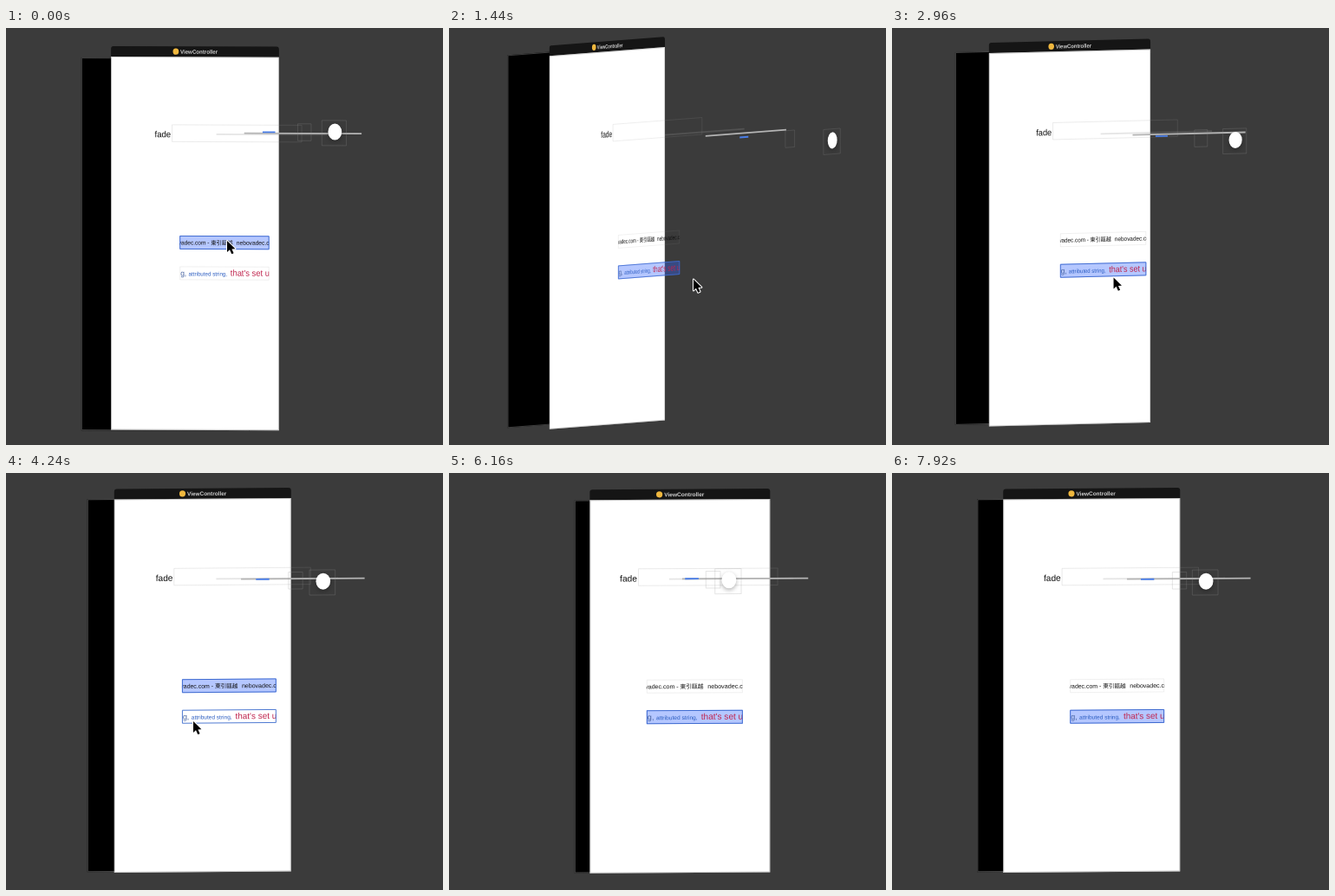
An HTML page with a canvas that plays this animation: 504x482 px, repeating every 8 s.

```html
<!DOCTYPE html>
<html lang="en">
<head>
<meta charset="utf-8">
<title>View hierarchy</title>
<style>
  html, body { margin: 0; width: 100%; height: 100%; overflow: hidden; background: #3b3b3b; }
  canvas { display: block; width: 504px; height: 482px; }
</style>
</head>
<body>
<canvas id="stage" width="504" height="482"></canvas>
<script>
const ctx = document.getElementById('stage').getContext('2d');
const LOOP = 8000, STEP = 80;
const SANS = '"Liberation Sans", Arial, "Noto Sans CJK SC", "Noto Sans CJK", sans-serif';
const FAINT = 'rgba(150,150,150,.25)';
const DRAG = [960, 3360];
const LABEL_Y = [208, 243.5];

// time, turn in degrees, tilt, width factor
const POSES = [
  [960, 19.9, -.027, 1],
  [1440, 46.9, .06, .946],
  [1980, 80, .085, 1],
  [2320, 60, .113, 1],
  [2640, 36, .06, 1],
  [DRAG[1], 14.8, .006, 1.024],
  [5600, 14.8, .006, 1.024],
  [6540, -12.3, -.008, 1],
  [7360, 13.4, .006, 1.018]
];

// free pointer moves: time, tip x, tip y
const MOVES = [
  [160, 255, 246],
  [640, 247, 283],
  [3520, 240, 286],
  [3760, 240, 246],
  [3920, 240, 246],
  [4160, 216, 287],
  [4560, 216, 287],
  [4960, 36, 486]
];

function sample(rows, t) {
  const i = rows.findIndex(r => r[0] > t);
  if (i < 0) return rows[rows.length - 1].slice(1);
  if (i === 0) return rows[0].slice(1);
  const a = rows[i - 1], b = rows[i];
  const f = (t - a[0]) / (b[0] - a[0]);
  return a.slice(1).map((v, j) => v + (b[j + 1] - v) * f);
}

// While dragging, the tip follows the turn and tilt it causes.
function pointerAt(t, deg, tilt) {
  const dragging = t >= DRAG[0] && t < DRAG[1];
  return dragging ? [299 + (deg - 60) * 1.3, 295 + (tilt - .113) * 84] : sample(MOVES, t);
}

function text(str, x, y, size, color, weight = '', align = 'left') {
  ctx.font = `${weight} ${size}px ${SANS}`;
  ctx.textAlign = align;
  ctx.fillStyle = color;
  ctx.fillText(str, x, y);
}

function box(x, y, w, h, fill, stroke) {
  if (fill) { ctx.fillStyle = fill; ctx.fillRect(x, y, w, h); }
  if (stroke) {
    ctx.strokeStyle = stroke;
    ctx.lineWidth = 1;
    ctx.strokeRect(x + .5, y + .5, w - 1, h - 1);
  }
}

function dot(x, y, rx, ry, color) {
  ctx.fillStyle = color;
  ctx.beginPath();
  ctx.ellipse(x, y, rx, ry, 0, 0, 7);
  ctx.fill();
}

function label(y, selected, hovered, drawText) {
  if (selected) box(66, y, 110, 16, 'rgba(50,100,255,.36)');
  ctx.save();
  ctx.beginPath();
  ctx.rect(66, y, 110, 16);
  ctx.clip();
  drawText(y + 11);
  ctx.restore();
  box(66, y, 110, 16, null, selected ? '#3f6bd0' : hovered ? '#4f7ad2' : 'rgba(150,150,150,.15)');
}

function drawPanel() {
  ctx.fillStyle = '#151515';
  ctx.beginPath();
  ctx.roundRect(0, -12, 206, 14, [3, 3, 0, 0]);
  ctx.fill();
  box(0, 0, 206, 431.5, '#fff', 'rgba(150,150,150,.5)');
  dot(79.5, -6, 3.6, 3.6, '#efb73e');
  text('ViewController', 85, -3.6, 6.5, '#cfcfcf', 'bold');
}

function drawMarquee(y) {
  text('nebovadec.com -', 102.5, y - .4, 7, '#111', '', 'right');
  text('東引甌越', 104.4, y - .4, 6.7, '#111');
  text('nebovadec.com', 135.7, y - .4, 7.1, '#111');
}

function drawStyled(y) {
  text('g,', 67, y, 9, '#47639f');
  text('attributed string,', 77, y, 6.6, '#2a5cc0');
  text("that's set up", 128.3, y, 10, '#c0264f');
}

function drawKnob() {
  box(149.5, 80.5, 31, 30, null, FAINT);
  ctx.save();
  ctx.shadowColor = 'rgba(0,0,0,.3)';
  ctx.shadowBlur = 5;
  ctx.shadowOffsetY = 2;
  dot(166, 94.2, 8.4, 9.5, '#fff');
  ctx.restore();
}

function drawPointer(x, y) {
  ctx.setTransform(1, 0, 0, 1, x, y);
  const shape = new Path2D('M0 0V13L3 10.3L5.3 15.2L7.6 14.2L5.4 9.4L9.4 9.2Z');
  ctx.lineJoin = 'round';
  ctx.lineWidth = 2;
  ctx.strokeStyle = '#fff';
  ctx.stroke(shape);
  ctx.fillStyle = '#000';
  ctx.fill(shape);
}

function draw(t) {
  const [deg, tilt, wide] = sample(POSES, t);
  const tip = pointerAt(t, deg, tilt);
  const a = deg * Math.PI / 180;
  const d = Math.sin(a), w = Math.cos(a) * wide;
  const left = 337.6 - 177 * w - 147 * d;
  const top = 31 + tilt * (145 * d - 130 * w);
  const layer = z => ctx.setTransform(w, -d * tilt - .006, 0, 1, left + z * d, top + z * w * tilt);

  const selected = t < 720 || (t >= 3920 && t < 4560) ? 0 : 1;
  const hovered = i => Math.abs(tip[1] - 39 - LABEL_Y[i]) < 8;

  ctx.setTransform(1, 0, 0, 1, 0, 0);
  box(0, 0, 504, 482, '#3b3b3b');

  layer(-49.5);
  box(-18.6, 0, 206, 431, '#000', '#4a4a4a');
  layer(0);
  drawPanel();

  layer(50);
  text('fade', 35.5, 94.5, 10.2, '#111');
  box(56.3, 79.5, 160, 20.5, null, 'rgba(150,150,150,.2)');
  [drawMarquee, drawStyled].forEach((content, i) =>
    label(LABEL_Y[i], selected === i, hovered(i), content));

  // slider parts, back to front
  [[93, 142, FAINT], [109, 144, '#b4b4b4'], [113.5, 15.5, '#4a7ee8']].forEach(([x, len, color], i) => {
    layer(100 + 50 * i);
    box(x, 91.2, len, 1.8, color);
  });
  layer(250);
  box(138, 83.2, 17.5, 20.5, null, FAINT);
  layer(300);
  drawKnob();

  if (t < 4960) drawPointer(...tip);
}

const start = performance.now();
function tick(now) {
  const t = Math.max(0, now - start) % LOOP;
  draw(Math.floor(t / STEP) * STEP);
  requestAnimationFrame(tick);
}
draw(0);
requestAnimationFrame(tick);
</script>
</body>
</html>
```
